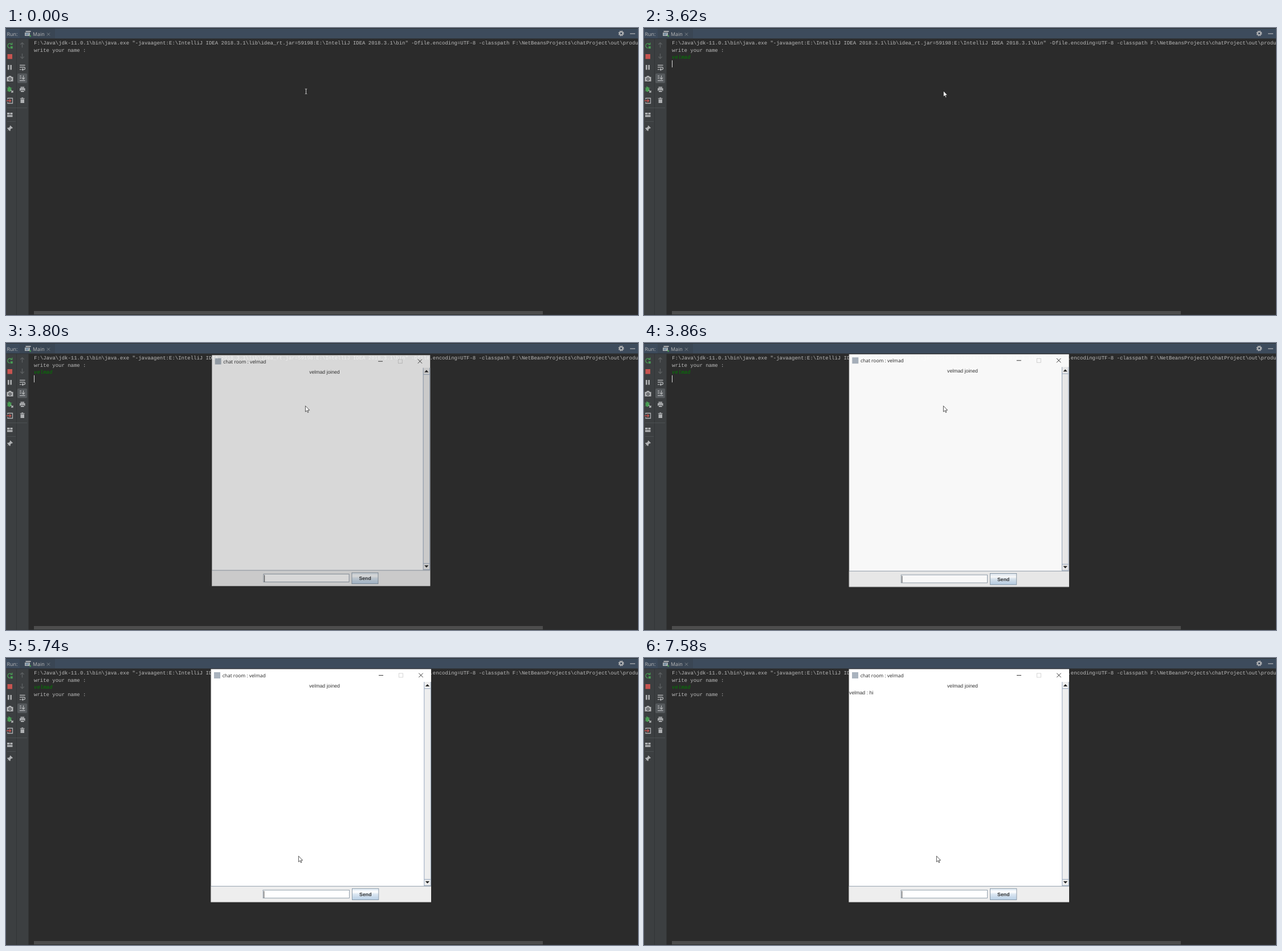
These frames come from a looping animation (1109 by 505 pixels, 8 s). An HTML page:

```html
<!DOCTYPE html>
<html lang="en">
<head>
<meta charset="utf-8">
<title>Chat room</title>
<style>
  html, body { margin: 0; width: 100%; height: 100%; overflow: hidden; background: #2b2b2b; }
  svg { display: block; }
  text { white-space: pre; text-rendering: geometricPrecision; }
  .mono { font: 8.975px "Liberation Mono", "Courier New", monospace; fill: #bbb; }
  .typed { font-style: italic; fill: #007f00; }
  .ui { font: 8.9px "Open Sans", "Noto Sans", sans-serif; fill: #bbb; }
  .title { font-size: 8.45px; fill: #222; }
  .chat { font: 8.75px "Liberation Sans", Arial, sans-serif; fill: #333; }
  .send { font-weight: bold; text-anchor: middle; }
  .line { fill: none; stroke: #afb1b3; stroke-width: 1.3; }
  .solid { fill: #afb1b3; }
  .green { stroke: #499c54; }
  .red { stroke: #c75450; }
  .dim { stroke: #5d6062; }
  .edge { fill: none; stroke: #7a8a99; stroke-width: .8; }
</style>
</head>
<body>
<svg width="1109" height="505" viewBox="0 0 1109 505">
  <defs>
    <linearGradient id="metal" x2="0" y2="1">
      <stop offset="0" stop-color="#dde8f3"/>
      <stop offset=".3" stop-color="#fff"/>
      <stop offset=".5" stop-color="#dbe6f1"/>
      <stop offset="1" stop-color="#b8cfe5"/>
    </linearGradient>
  </defs>

  <!-- tool window header and toolbars -->
  <rect width="1109" height="505" fill="#2b2b2b"/>
  <rect width="39.5" height="505" fill="#3c3f41"/>
  <rect x="18" y="19" width="1" height="486" fill="#323537"/>
  <rect width="1109" height="19" fill="#3d4b5c"/>
  <rect x="24" y="1" width="62" height="18" fill="#3a4654"/>
  <path d="M0 .5H1109M0 18.8H1109" stroke="#2f3336"/>
  <text class="ui" x="1.5" y="13.8">Run:</text>
  <text class="ui" x="47" y="13.8">Main</text>
  <path class="line" d="M72 8.5l5 5m0-5l-5 5" style="stroke:#7d858c;stroke-width:1"/>
  <g>
    <path class="solid" d="M34.5 5h9v2h-9zM33 8h9v6h-9z"/>
    <path d="M34.5 10h6M34.5 12h4" stroke="#3f6f92"/>
    <circle cx="42.5" cy="14" r="1.5" fill="#499c54"/>
  </g>
  <g>
    <circle class="line" cx="1079.5" cy="9.5" r="2.7" style="stroke-width:2"/>
    <circle class="line" cx="1079.5" cy="9.5" r="4.3" style="stroke-dasharray:2 1.377"/>
    <path class="line" d="M1095 10H1104"/>
  </g>

  <!-- left icon column -->
  <path class="line green" d="M9.5 28.2A4 4 0 1 0 7 35.2M10.8 25.8v3.2H7.6"/>
  <rect x="7.8" y="32.2" width="4" height="4" fill="#499c54"/>
  <rect x="2.5" y="46" width="8.5" height="8.5" fill="#c75450"/>
  <path class="solid" d="M3 65h2.6v8.5H3zM7.4 65H10v8.5H7.4z"/>
  <path class="solid" d="M1.5 86h2.6l1-1.8h3.8l1 1.8h2.6v8h-11z"/>
  <circle cx="7" cy="89.8" r="2" class="line" style="stroke:#3c3f41"/>
  <g>
    <ellipse cx="6" cy="108" rx="3" ry="4.2" fill="#499c54"/>
    <path class="line green" d="M1.5 105l9 6M1.5 111l9-6M2 108h8M4 103l4 2" style="stroke-width:1"/>
    <path class="line" d="M8 109l4 4m0-3v3h-3"/>
  </g>
  <path class="line" d="M3 125.5V123.500H11.500V132.500H3V130.500"/>
  <path class="line red" d="M1 128h7.500M6 125.500l2.500 2.500-2.500 2.500"/>
  <path class="line" d="M2 140.500H37M2 164.500H17" style="stroke:#515558;stroke-width:.8"/>
  <path class="solid" d="M2 149h4.500v3.300H2zM7.500 149H11.500v3.300H7.500zM2 153.300h9.500v3.200H2z"/>
  <path class="solid" d="M7.500 171.500l4.500 4.300-1.200.9-1-.3-2 2.200v2l-1 .8-2.300-2.200-2.900 2.600 2.600-3-2.200-2.200.8-1h2l2.200-2-.4-1z"/>

  <!-- right icon column -->
  <path class="line dim" d="M28.500 34.500V26M25.300 29l3.200-3.200 3.200 3.200M28.500 45V53.500M25.300 50.500l3.200 3.200 3.200-3.200"/>
  <path class="line" d="M24 65.500H33.500M24 69H31.500a2 2 0 0 1 0 4H28.500M30 71l-2 2 2 2M24 73h2.500"/>
  <rect x="20" y="80" width="17" height="17" rx="2" fill="#55595c"/>
  <path class="line" d="M24 92.500H33.500M24 84.500h3M24 88h3M30.500 83.500v6M28 87.500l2.500 2.500 2.500-2.500"/>
  <path class="solid" d="M25.500 103.500h6.500v2h-6.500zM24 106h9.500v4.500h-1.500v-1.500h-6.500v1.500H24zM26 110h5.500v2.500H26z"/>
  <path class="solid" d="M24.800 123.500h2.200l.7-1.200h2l.7 1.200h2.200v1.300h-7.800zM25.500 125.500h6.500v6.500h-6.500z"/>

  <!-- console -->
  <text class="mono" x="49.200" y="29">F:\Java\jdk-11.0.1\bin\java.exe "-javaagent:E:\IntelliJ IDEA 2018.3.1\lib\idea_rt.jar=59198:E:\IntelliJ IDEA 2018.3.1\bin" -Dfile.encoding=UTF-8 -classpath F:\NetBeansProjects\chatProject\out\production\chatProject</text>
  <text class="mono" x="49" y="41.500">write your name :</text>
  <text class="mono typed" id="typed" x="49" y="54"></text>
  <text class="mono" id="again" x="49" y="66.500">write your name :</text>
  <rect id="caret" width="1" height="12.500" fill="#d8d8d8"/>
  <rect x="49" y="498" width="893" height="6" fill="#4d4d4d"/>
  <path d="M0 504.700H1109" stroke="#323537" stroke-width=".6"/>

  <!-- chat window -->
  <g id="win">
    <rect x="359.500" y="19.500" width="386.500" height="410" fill="#fff"/>
    <rect x="359.500" y="402" width="386.500" height="27.500" fill="#eee"/>
    <rect x="365" y="25" width="11" height="11" fill="#a9b3be"/>
    <text class="ui title" x="379.800" y="34">chat room : <tspan class="who"></tspan></text>
    <path d="M654 30.500h8M724.300 26.700l7.400 7.400m0-7.400l-7.400 7.400" stroke="#222" stroke-width=".9" fill="none"/>
    <rect x="689.500" y="27" width="7" height="7" fill="none" stroke="#ccc" stroke-width=".8"/>
    <rect x="733.500" y="42" width="12.500" height="360" fill="#eee"/>
    <path class="edge" d="M733.800 42V401M745.300 42V401M734 53.800H745M734 389.500H745M734 400.300H745" style="stroke:#8096b2"/>
    <path d="M735.800 50l3.700-4 3.700 4zM735.800 392.800h7.400l-3.700 4z" fill="#222"/>
    <path class="edge" d="M359.500 401.600H746"/>
    <text class="chat" x="559" y="52" text-anchor="middle"><tspan class="who"></tspan> joined</text>
    <text class="chat" id="message" x="360" y="64"><tspan class="who"></tspan> : hi</text>
    <rect x="451" y="408.300" width="151.500" height="14" fill="#fff" class="edge" style="fill:#fff"/>
    <text class="chat" id="draft" x="452.600" y="418.800"></text>
    <rect id="fieldCaret" y="410" width=".9" height="12" fill="#333"/>
    <rect x="607.400" y="405.800" width="46.500" height="19.700" class="edge" style="fill:url(#metal)"/>
    <text class="chat send" x="630.800" y="419">Send</text>
    <path d="M359.700 19.500V429.300H746" fill="none" stroke="#777" stroke-width=".4"/>
  </g>

  <!-- pointers -->
  <path id="beam" d="M524.800 107.200h1.200l.5.500.5-.5h1.200M526.500 107.500V115.500M524.800 115.900h1.200l.5-.5.5.5h1.200" fill="none" stroke="#ddd" stroke-width=".9"/>
  <path id="arrow" d="M0 0V10.300L2.400 8.100 4 11.700 5.500 11 4 7.500H7.200Z" fill="#fff" stroke="#111" stroke-width=".7"/>
</svg>
<script>
const LOOP = 8000, NAME = 'velmad', PITCH = 5.385;
const $ = id => document.getElementById(id);
document.querySelectorAll('.who').forEach(el => el.textContent = NAME);

// Tables of [start ms, value...]; each row holds until the next.
const keys = [1450, 1680, 1830, 1910, 2140, 2290];
const consoleCaret = [
  [0, null], [530, 49, 44], [990, null],
  ...keys.map((ms, i) => [ms, 49 + (i + 1) * PITCH - .4, 44]),
  [3000, null], [3070, 49, 56.8], [3950, null]
];
const windowPose = [[0, 0, 1], [3710, .505, .975], [3800, .815, .991], [3860, .97, .9985], [3950, 1, 1]];
const drafts = [[0, ''], [5800, 'h'], [6030, 'hi'], [7580, '']];
const fieldCaret = [
  [0, 452.3], [4250, null], [4710, 452.3], [5180, null], [5740, 452.3],
  [5800, 457.2], [6030, 458.7], [6570, null], [7040, 458.7], [7520, null], [7580, 452.3]
];
const pointer = [
  [0, 525.4, 110.7], [4250, 528, 118], [4330, 542, 165], [4400, 555, 245], [4480, 546, 320],
  [4560, 518.5, 357.5], [4710, 518, 357.5], [4790, 516, 357.3], [4940, 514.5, 351], [5030, 513.4, 348.5]
];

const at = (table, t) => table.findLast(row => row[0] <= t).slice(1);
const show = (el, on) => el.setAttribute('visibility', on ? 'visible' : 'hidden');
const write = (el, s) => { if (el.textContent !== s) el.textContent = s; };

function place(el, x, y) {
  show(el, x !== null);
  if (x !== null) el.setAttribute('transform', `translate(${x} ${y})`);
}

function draw(t) {
  write($('typed'), NAME.slice(0, keys.filter(ms => ms <= t).length));
  place($('caret'), ...at(consoleCaret, t));
  show($('again'), t >= 3950);

  const [alpha, scale] = at(windowPose, t);
  $('win').setAttribute('opacity', alpha);
  $('win').setAttribute('transform', `translate(552.75 224.5) scale(${scale}) translate(-552.75 -224.5)`);
  write($('draft'), at(drafts, t)[0]);
  place($('fieldCaret'), at(fieldCaret, t)[0], 0);
  show($('message'), t >= 7580);

  show($('beam'), t < 3620);
  place($('arrow'), ...at(pointer, t));
  show($('arrow'), t >= 3620);
}

const start = performance.now();
function tick() {
  draw((performance.now() - start) % LOOP);
  requestAnimationFrame(tick);
}
tick();
</script>
</body>
</html>
```
